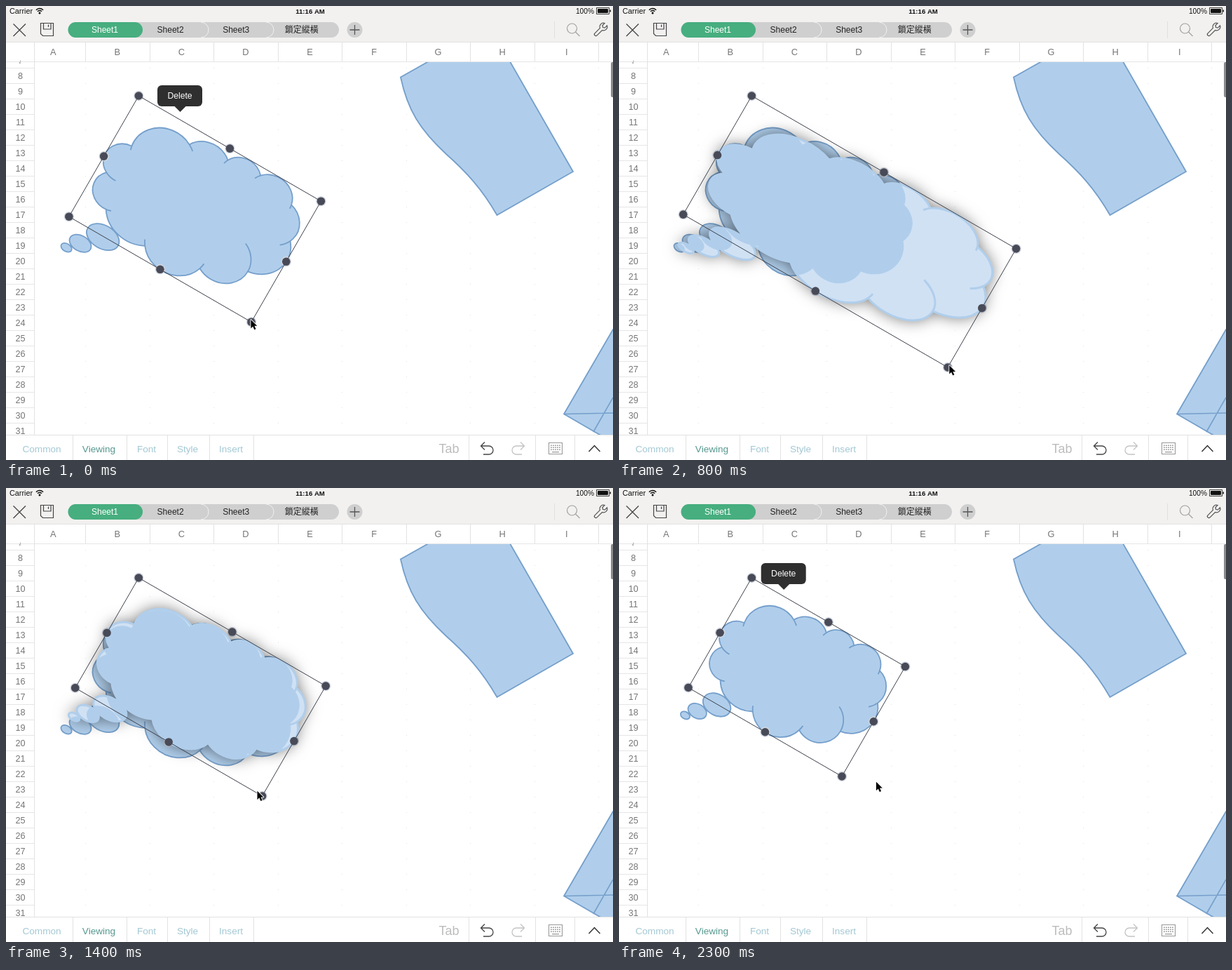
Write an HTML page with a canvas that moves like this. It is 866 px wide and 647 px high and loops after 2.4 s.

```html
<!DOCTYPE html>
<html lang="en">
<head>
<meta charset="utf-8">
<title>Resizing a cloud callout</title>
<style>
html, body { margin: 0; width: 866px; height: 647px; overflow: hidden; background: #fff; }
canvas { display: block; }
</style>
</head>
<body>
<canvas id="stage" width="866" height="647"></canvas>
<script>
const ctx = document.getElementById('stage').getContext('2d');
const SANS = '"Liberation Sans", Arial, sans-serif';
const CJK = '"Noto Sans CJK TC", "Noto Sans CJK", sans-serif';
const FILL = '#b0ceeb', EDGE = '#759fcb', GHOST = '#d0e1f4';
const TAU = Math.PI * 2, COS = Math.cos(Math.PI / 6), SIN = 0.5;
const ORIGIN = { x: 189.3, y: 128 };
const DROP = 21;

// Dragged corner: step, x, y
const DRAG = [
  [0, 350, 450.4], [1, 350, 453], [4, 372, 560], [5, 393, 552],
  [8, 469, 515], [12, 445, 516], [14, 365.6, 439], [19, 318, 411]
];

// Cloud lobes on a 432-unit square: radius, start, sweep, and the crease at the start
// (positive: this lobe reaches back; negative: the previous one runs on)
const LOBES = [
  [67.5, -190.5, 123.8, 12], [53.3, -144.1, 89.9, -12], [43.7, -145.8, 99.7, 18],
  [48.6, -131, 117.2, 18], [53.3, -78.7, 109, -15], [67.8, -46.3, 130.3, -28],
  [57.9, 0.6, 114, 71], [67.5, 22.5, 115.2, 16], [77.2, 66.2, 75.7, -14],
  [43.6, 85.1, 146.7, 11], [43.5, 113.2, 152.5, 26]
];
const UNIT = 432, ASPECT = 1.361;

const body = new Path2D(), creases = new Path2D();

function buildCloud() {
  const param = deg => {
    const a = deg * Math.PI / 180;
    return Math.atan2(Math.sin(a), ASPECT * Math.cos(a));
  };
  const spot = (r, deg) => [r * Math.cos(param(deg)), r * ASPECT * Math.sin(param(deg))];
  const addArc = (path, [cx, cy, r], from, to) =>
    path.ellipse(cx, cy, r, r * ASPECT, 0, param(from), param(to));
  const addCrease = (lobe, from, to) => {
    const [x, y] = spot(lobe[2], from);
    creases.moveTo(lobe[0] + x, lobe[1] + y);
    addArc(creases, lobe, from, to);
  };
  let x = 39, y = 143.7, last, lastEnd;
  for (const [r, start, sweep, crease] of LOBES) {
    const end = start + sweep, [sx, sy] = spot(r, start), [ex, ey] = spot(r, end);
    const lobe = [x - sx, y - sy, r];
    addArc(body, lobe, start, end);
    if (crease > 0) addCrease(lobe, start - crease, start);
    else addCrease(last, lastEnd, lastEnd - crease);
    x += ex - sx;
    y += ey - sy;
    last = lobe;
    lastEnd = end;
  }
  body.closePath();
  for (const [bx, by, r] of [[81, 434, 36], [47.5, 486, 24], [27, 519, 12]]) {
    body.moveTo(bx + r, by);
    body.arc(bx, by, r, 0, TAU);
  }
}
buildCloud();

function cloud(w, h) {
  const sx = w / UNIT, sy = h / UNIT;
  const m = new DOMMatrix([COS * sx, SIN * sx, -SIN * sy, COS * sy, ORIGIN.x, ORIGIN.y]);
  const outline = new Path2D(), lines = new Path2D();
  outline.addPath(body, m);
  lines.addPath(creases, m);
  return { outline, lines };
}

function strokeCloud(c, color, width) {
  ctx.strokeStyle = color;
  ctx.lineWidth = width;
  ctx.stroke(c.outline);
  ctx.stroke(c.lines);
}

function drawCloud(c) {
  ctx.fillStyle = FILL;
  ctx.fill(c.outline);
  strokeCloud(c, EDGE, 1.8);
}

function drawGhost(g, base) {
  ctx.save();
  ctx.shadowColor = 'rgba(0,0,0,.55)';
  ctx.shadowBlur = 22;
  ctx.fillStyle = GHOST;
  ctx.fill(g.outline);
  ctx.restore();
  strokeCloud(g, FILL, 3);
  ctx.save();
  ctx.clip(g.outline);
  ctx.fillStyle = FILL;
  ctx.fill(base.outline);
  ctx.restore();
}

function text(s, x, y, size, color, align = 'center', font = SANS, weight = 'normal') {
  ctx.font = `${weight} ${size}px ${font}`;
  ctx.textAlign = align;
  ctx.fillStyle = color;
  ctx.fillText(s, x, y);
}

function rect(x, y, w, h, color) {
  ctx.fillStyle = color;
  ctx.fillRect(x, y, w, h);
}

function round(x, y, w, h, r, color) {
  ctx.beginPath();
  ctx.roundRect(x, y, w, h, r);
  ctx.fillStyle = color;
  ctx.fill();
}

function disc(x, y, r, color) {
  ctx.beginPath();
  ctx.arc(x, y, r, 0, TAU);
  ctx.fillStyle = color;
  ctx.fill();
}

function arc(x, y, r, from, to, color, width) {
  ctx.beginPath();
  ctx.arc(x, y, r, from, to);
  ctx.strokeStyle = color;
  ctx.lineWidth = width;
  ctx.stroke();
}

function draw(d, color, width = 1.3, fill) {
  const p = new Path2D(d);
  if (fill) { ctx.fillStyle = fill; ctx.fill(p); }
  ctx.strokeStyle = color;
  ctx.lineWidth = width;
  ctx.stroke(p);
}

function clipSheet() {
  ctx.beginPath();
  ctx.rect(41, 80, 825, 531);
  ctx.clip();
}

function boxOf([x, y]) {
  const dx = x - ORIGIN.x, dy = y - ORIGIN.y;
  return { w: dx * COS + dy * SIN, h: dy * COS - dx * SIN };
}

function corners({ w, h }) {
  return [[0, 0], [w, 0], [w, h], [0, h]].map(([a, b]) =>
    [ORIGIN.x + a * COS - b * SIN, ORIGIN.y + a * SIN + b * COS]);
}

function drawHandles(pts, r, color) {
  pts.forEach((p, i) => {
    const q = pts[(i + 1) % 4];
    disc(...p, r, color);
    disc((p[0] + q[0]) / 2, (p[1] + q[1]) / 2, r, color);
  });
}

function drawFrame(pts) {
  ctx.beginPath();
  pts.forEach(p => ctx.lineTo(...p));
  ctx.closePath();
  ctx.strokeStyle = '#3e424c';
  ctx.lineWidth = 1;
  ctx.stroke();
}

function drawPopup(x, y) {
  round(x - 32, y, 64, 30, 6, '#2f2f2f');
  ctx.beginPath();
  ctx.moveTo(x - 7.5, y + 30);
  ctx.lineTo(x + .5, y + 38);
  ctx.lineTo(x + 8.5, y + 30);
  ctx.fill();
  text('Delete', x, y + 19, 12.2, '#fff');
}

function drawPointer(x, y) {
  ctx.save();
  ctx.translate(x, y);
  ctx.lineJoin = 'round';
  const arrow = 'M0 0V12L2.8 9.4L4.9 14L6.9 13.1L4.9 8.6H8.6Z';
  draw(arrow, '#fff', 2);
  draw(arrow, '#000', .2, '#000');
  ctx.restore();
}

function drawSheet() {
  rect(0, 0, 866, 647, '#fff');
  for (let c = 0; c < 9; c++)
    for (let r = 0; r < 24; r++)
      rect(Math.round(113 + c * 91.5), 88 + r * 22, 1, 1, '#e2e2e2');
  ctx.save();
  clipSheet();
  draw('M563 101.5C573 148 590 176 628 211C655 235 678 259 700.5 298L809 236L700 46L640 58Z', EDGE, 1.8, FILL);
  draw('M866 461L796 581.5L866 622L900 600V461Z', EDGE, 1.8, FILL);
  draw('M796 581.5L866 580M838 607L866 558', EDGE, 1.6);
  ctx.restore();
  round(863, 80, 5, 50, 2, '#8b8b8b');
}

function drawHeaders() {
  rect(0, 80, 41, 531, '#fff');
  ctx.save();
  ctx.beginPath();
  ctx.rect(0, 77, 41, 534);
  ctx.clip();
  for (let n = 7; n < 32; n++) {
    const y = 99 + (n - 8) * 22.02;
    text(n, 20.5, y + 4.8, 12.6, '#757575');
    rect(0, Math.round(y + 11), 41, 1, '#e6e6e6');
  }
  ctx.restore();
  rect(0, 52, 866, 26, '#fff');
  rect(0, 79, 866, 1, '#e6e6e6');
  rect(40, 52, 1, 559, '#e2e2e2');
  for (let c = 0; c < 9; c++) {
    text('ABCDEFGHI'[c], 67.3 + c * 91.55, 70, 12.8, '#757575');
    rect(Math.round(113 + c * 91.5), 52, 1, 27, '#e2e2e2');
  }
}

function drawStatus() {
  text('Carrier', 5, 11, 10.8, '#111', 'left');
  text('11:16 AM', 434, 11, 9.6, '#111', 'center', SANS, 'bold');
  text('100%', 839, 11, 10.2, '#111', 'right');
  for (const r of [4.2, 7]) arc(48, 10.6, r, -Math.PI * .76, -Math.PI * .24, '#111', 1.5);
  disc(48, 10, 1.5, '#111');
  draw('M842.5 2.5H860.5V11.5H842.5Z', '#111', .8);
  round(844, 4, 15, 6, 1, '#111');
  rect(861.5, 5.5, 1.5, 3, '#111');
}

function drawWrench() {
  ctx.save();
  ctx.translate(848, 34);
  ctx.rotate(Math.PI / 4);
  draw('M-2.2 -1.5V9A2.2 2.2 0 0 0 2.2 9V-1.5A5.2 5.2 0 0 0 2.4 -11V-6.5L0 -5L-2.4 -6.5V-11A5.2 5.2 0 0 0 -2.2 -1.5Z', '#555', 1.2);
  ctx.restore();
}

function drawTopBar() {
  rect(0, 0, 866, 52, '#f2f1f0');
  rect(0, 51, 866, 1, '#e2e2e2');
  drawStatus();
  draw('M10.5 25.5L28 43M28 25.5L10.5 43', '#444');
  draw('M49.5 24.5H67.5V42.5H52.5L49.5 39.5ZM53.5 24.5V33H64V24.5M60.5 26.5V30', '#444', 1.2);
  round(89, 23, 386, 22, 11, '#cfcfcf');
  for (const x of [278, 371]) arc(x, 34, 11, -Math.PI / 2, Math.PI / 2, '#f1f1f1', 1);
  round(88.5, 23, 106.5, 22, 11, '#47ae7f');
  ['Sheet1', 'Sheet2', 'Sheet3', '鎖定縱橫'].forEach((s, i) =>
    text(s, 141 + i * 93.6, 38.3, 12, i ? '#222' : '#fff', 'center', i < 3 ? SANS : CJK));
  disc(497.5, 34, 11, '#cfcfcf');
  draw('M490.5 34H504.5M497.5 27V41', '#555');
  rect(782, 22, 1, 24, '#e0e0e0');
  arc(807.5, 32, 7, 0, TAU, '#a2a2a2', 1.2);
  draw('M812.5 37L818.5 43', '#a2a2a2');
  drawWrench();
}

function drawBottomBar() {
  rect(0, 611, 866, 36, '#fff');
  rect(0, 611, 866, 1, '#e2e2e2');
  for (const x of [95, 172, 230, 290, 353, 660, 755, 811]) rect(x, 612, 1, 35, '#e2e2e2');
  const tabs = [['Common', 51], ['Viewing', 132.5], ['Font', 200.5], ['Style', 259], ['Insert', 321]];
  for (const [s, x] of tabs) text(s, x, 635.5, 13.6, s === 'Viewing' ? '#56988f' : '#a3c8d4');
  text('Tab', 632, 637, 18, '#bcbcbc');
  const arrow = 'M683 621.5L677.5 627L683 632.5M678 627H689A6 6 0 0 1 689 639H681';
  draw(arrow, '#444');
  ctx.save();
  ctx.translate(1417, 0);
  ctx.scale(-1, 1);
  draw(arrow, '#c4c4c4');
  ctx.restore();
  draw('M774.5 622.5H793.5V638.5H774.5Z', '#999', 1.1);
  for (let r = 0; r < 3; r++)
    for (let c = 0; c < 5; c++) rect(777 + c * 3, 625.5 + r * 3, 1.8, 1.5, '#999');
  rect(779, 635, 10, 1.3, '#999');
  draw('M831.5 635L839.5 626.5L847.5 635', '#333', 1.5);
}

// Smooth curve through the drag keys
function cornerAt(step) {
  const end = DRAG.length - 1;
  step = Math.min(step, DRAG[end][0]);
  let i = 0;
  while (i < end - 1 && step >= DRAG[i + 1][0]) i++;
  const a = DRAG[i], b = DRAG[i + 1], span = b[0] - a[0], t = (step - a[0]) / span;
  const slope = (k, n) => {
    const p = DRAG[k - 1], q = DRAG[k + 1];
    return p && q ? (q[n] - p[n]) / (q[0] - p[0]) : 0;
  };
  const t2 = t * t, t3 = t2 * t;
  return [1, 2].map(n =>
    (2 * t3 - 3 * t2 + 1) * a[n] + (3 * t2 - 2 * t3) * b[n] +
    span * ((t3 - 2 * t2 + t) * slope(i, n) + (t3 - t2) * slope(i + 1, n)));
}

// The pointer runs a little ahead of the corner and leaves after the drop
function pointerAt(step) {
  const [x, y] = cornerAt(step + .4), away = Math.max(0, step - DROP) / 2;
  return [x + 49 * away, y - 1.5 + 9.5 * away];
}

const sizeOf = step => boxOf(cornerAt(step));
const cloudAt = step => cloud(sizeOf(step).w, sizeOf(step).h);
const before = cloudAt(0), after = cloudAt(DROP);

function render(step) {
  const pts = corners(sizeOf(step));
  const base = step < DROP ? before : after;
  drawSheet();
  ctx.save();
  clipSheet();
  drawCloud(base);
  drawHandles(pts, 7.2, '#d3d7e0');
  if (step > 0 && step < DROP) drawGhost(cloudAt(step), base);
  drawFrame(pts);
  drawHandles(pts, 5.8, '#484b57');
  ctx.restore();
  drawHeaders();
  drawTopBar();
  drawBottomBar();
  if (step === 0) drawPopup(248, 113);
  if (step > DROP) drawPopup(234.7, 107);
  drawPointer(...pointerAt(step));
}

const start = performance.now();
function tick(now) {
  render(Math.floor(Math.max(0, now - start) % 2400 / 100));
  requestAnimationFrame(tick);
}
render(0);
requestAnimationFrame(tick);
</script>
</body>
</html>
```
